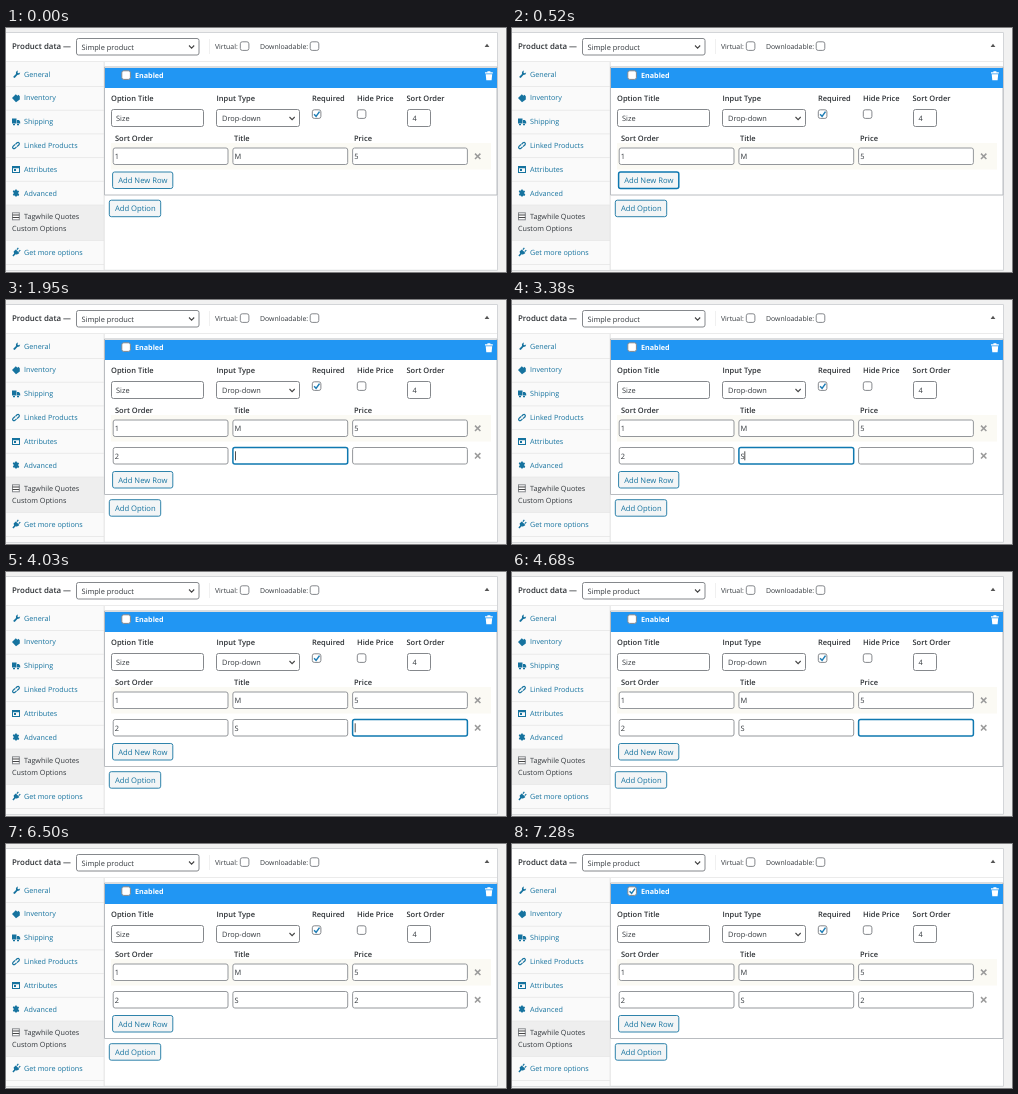
An HTML page that plays this animation: 500 by 244 pixels, repeating every 8 s.

```html
<!DOCTYPE html>
<html lang="en">
<head>
<meta charset="utf-8">
<title>Product options</title>
<style>
  html, body { margin: 0; width: 100%; height: 100%; overflow: hidden; background: #f1f1f1; }
  svg { display: block; width: 500px; height: 244px; }
  text { font: 7.4px "Open Sans", "Noto Sans", sans-serif; fill: #32373c; text-rendering: geometricPrecision; }
  .label { font-size: 7.5px; font-weight: 600; fill: #2b2f33; }
  .link { font-size: 7.2px; fill: #16739f; }
  .icon { fill: #16739f; stroke: none; }
  .field { fill: #fff; stroke: #85888c; }
  .cell { fill: #fff; stroke: #94979b; }
  .button { fill: #f3f5f6; stroke: #2f83ab; }
  .focus { stroke: #0f78b0; stroke-width: 1.5; }
</style>
</head>
<body>
<svg id="stage" viewBox="0 0 500 244"></svg>
<script>
const LOOP = 8000;
const stage = document.getElementById('stage');

const text = (x, y, s, cls = '', size = 0) =>
  `<text x="${x}" y="${y}" class="${cls}"${size ? ` style="font-size:${size}px"` : ''}>${s}</text>`;
const box = (x, y, w, h, fill) => `<rect x="${x}" y="${y}" width="${w}" height="${h}" fill="${fill}"/>`;
const frame = (x, y, w, h, cls = 'field', r = 2) =>
  `<rect x="${x}" y="${y}" width="${w}" height="${h}" rx="${r}" class="${cls}"/>`;
const line = (d, color, width = 1) => `<path d="${d}" fill="none" stroke="${color}" stroke-width="${width}"/>`;
const check = (x, y, on) => frame(x, y, 8.6, 8.6) +
  (on ? line(`M${x + 1.8} ${y + 4.4}l2 2.2 3.4-4.8`, '#1e7db5', 1.5) : '');
const chevron = (x, y) => line(`M${x} ${y}l2.6 2.6 2.6-2.6`, '#444', 1.1);
const button = (x, y, w, s, focused) =>
  frame(x, y, w, 16.5, focused ? 'button focus' : 'button') + text(x + 5.6, y + 11, s, 'link', 7.65);

// Wrench, tag, truck, card, gear and plug
const icons = [
  'M7 49l3-3q-.6-2.6 2-3.5l-.6 1.9 1.1.9 1.7-.8q-.2 2.5-2.8 2.6l-2.7 2.8z',
  'M6 70l3.8-3.8 1.6 1.6 1-1 1.4 1.4v3.4l-3.8 2.6z',
  'M6 90.5h4.5v5H6zM11 92h2l1.2 1.7v1.8H11zM7 96h2v1.2H7zM11 96h2v1.2h-2z',
  'M6 138h8v7H6zM7 140.2v3.8h6v-3.8zM8 141h2v2H8z',
  'M9.3 161.6h1.4l.3 1.2 1.1-.4 1 1.2-.8 1 .1 1.2.9.8-.9 1.3-1.2-.4-.5 1H9.3l-.4-1-1.2.3-.9-1.2.8-.9v-1.2l-.9-.9.9-1.3 1.3.5z',
  'M7.6 223.6l2.2-2.2 3.6 3.6q-1.6 2-3.8 1.3L7.4 228.4l-1-1 1.7-1.8zM10.4 221.2l1.5-1.7.9.7-1.4 1.9zM12.3 223.2l1.6-1.5.8.8-1.6 1.6z'
];

function sidebar() {
  const tabs = ['General', 'Inventory', 'Shipping', 'Linked Products', 'Attributes', 'Advanced'];
  const y = i => 46 + i * 23.8;
  return box(0, 34, 98, 208, '#fafafa') + box(0, 177, 98, 35, '#eee') +
    [...tabs.map((_, i) => 58.5 + i * 23.7), 212.5, 236.5].map(v => line(`M0 ${v}H98`, '#eaeaea')).join('') +
    line('M98.2 34V242', '#e3e3e3') +
    tabs.map((s, i) => text(18, y(i) + 2.6, s, 'link')).join('') +
    text(18, 191.2, 'Tagwhile Quotes', '', 7.2) + text(6, 203.2, 'Custom Options', '', 7.2) +
    text(18, 227, 'Get more options', 'link') +
    icons.map(d => `<path class="icon" fill-rule="evenodd" d="${d}"/>`).join('') +
    line('M9.5 116.3l1.5-1.5q1.2-.8 2 0t0 2l-2 1.8M10.5 118.8l-1.5 1.5q-1.2.8-2 0t0-2l2-1.8', '#16739f', 1.2) +
    frame(6.5, 184.8, 6.8, 7, 'field', 0) + line('M6.5 187h6.8M6.5 189.5h6.8', '#444', 1.1);
}

function header() {
  return box(0, 4, 491.5, 238.5, '#fff') + line('M0 4.5H491.5V242.3H0', '#d3d5d8') + line('M0 33.5H491', '#ebebeb') +
    text(6, 21.2, 'Product data —', 'label', 7.9) + line('M203.5 11V26', '#f0f0f0') +
    frame(70.5, 10.5, 122.5, 16.5) + text(75.5, 21.6, 'Simple product') + chevron(183, 17.5) +
    text(209, 21, 'Virtual:', '', 6.9) + check(234.3, 13.8) +
    text(254, 21, 'Downloadable:', '', 6.9) + check(304.2, 13.8) +
    '<path d="M478.6 19l2.4-3.2 2.4 3.2z" fill="#555"/>';
}

function option(enabled, bottom) {
  return line(`M98.5 39V${bottom}H491V39z`, '#b9bcc0') + box(99, 40, 392, 20, '#2196f3') +
    check(115.8, 42.8, enabled) +
    `<text x="129" y="49.9" style="fill:#fff;font-size:7.2px;font-weight:700">Enabled</text>` +
    '<path d="M479 44.2h2.4v-.9h3v.9h2.4v1.2H479zM479.7 46.2h6.5l-.6 6h-5.3z" fill="#fff"/>' +
    [[105, 'Option Title'], [210.5, 'Input Type'], [306, 'Required'], [351, 'Hide Price'], [400.5, 'Sort Order']]
      .map(([x, s]) => text(x, 73, s, 'label')).join('') +
    frame(105.5, 81.5, 92, 17) + text(110, 92.7, 'Size') +
    frame(210.5, 81.5, 83, 17) + text(216, 92.7, 'Drop-down') + chevron(283.5, 89) +
    check(306.3, 81.8, true) + check(351.3, 81.8) +
    frame(401.5, 81.5, 23, 17) + text(406.5, 92.7, '4') +
    [[109, 'Sort Order'], [228, 'Title'], [348, 'Price']].map(([x, s]) => text(x, 112.6, s, 'label')).join('');
}

function row(y, values, focused = -1, caret = false) {
  return values.map((s, i) => {
    const x = 107.2 + i * 119.7;
    const caretX = x + (s ? 5.9 : 2.6);
    return frame(x, y, 114.8, 16.5, i === focused ? 'cell focus' : 'cell') + text(x + 1.6, y + 11.1, s) +
      (i === focused && caret ? line(`M${caretX} ${y + 3.8}v9`, '#222', .8) : '');
  }).join('') + line(`M469 ${y + 5.6}l5.4 5.4m0-5.4l-5.4 5.4`, '#9a9a9a', 1.5);
}

const fixed = header() + sidebar();
let shown = '';

function draw(t) {
  const within = (a, b) => t >= a && t < b;
  const added = t >= 910;
  const shift = added ? 27.5 : 0;
  const focused = within(1950, 4030) ? 1 : within(4030, 6500) ? 2 : -1;
  const caret = !within(2600, 3120) && !within(4680, 5070) && !within(5720, 6240);
  const values = ['2', t >= 3380 ? 'S' : '', t >= 5070 ? '2' : ''];
  const picture = fixed + option(t >= 6760, 167 + shift) +
    box(105, 115, 380, 26.5, '#fbfaf4') + row(120, ['1', 'M', '5']) +
    (added ? row(147.5, values, focused, caret) : '') +
    button(106.6, 144 + shift, 60.2, 'Add New Row', within(520, 1950)) +
    button(103.3, 172.2 + shift, 51.4, 'Add Option');
  if (picture !== shown) stage.innerHTML = shown = picture;
}

function tick() {
  draw(performance.now() % LOOP);
  requestAnimationFrame(tick);
}
tick();
</script>
</body>
</html>
```
